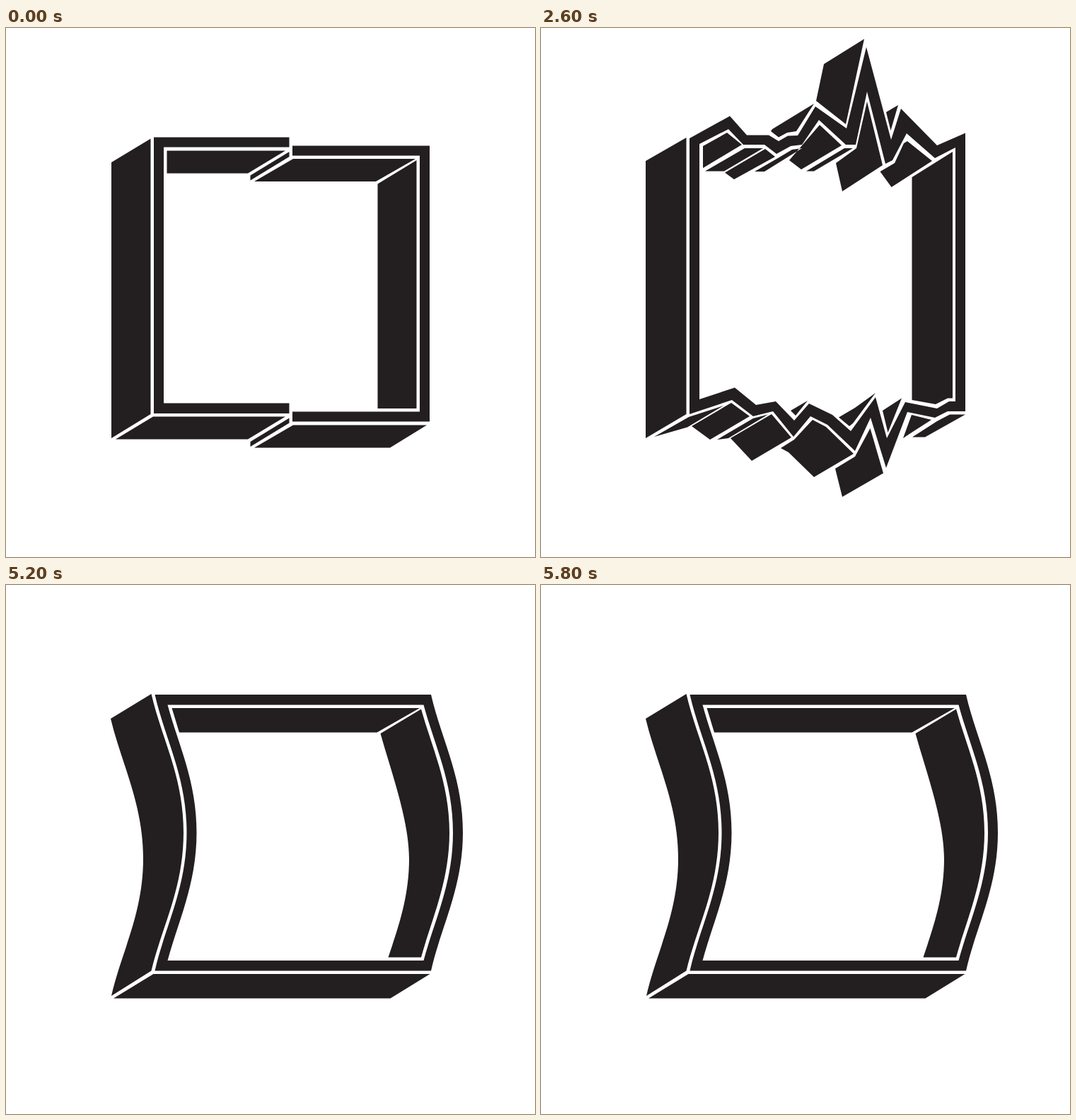
Recreate the animation shown at these times as an HTML page. Size 748x748 px, loop 7.8 s.

```html
<!DOCTYPE html>
<html lang="en">
<head>
<meta charset="utf-8">
<title>Shifting frame</title>
<style>
  html, body { margin: 0; width: 100%; height: 100%; overflow: hidden; background: #fff; }
  svg { display: block; width: 100%; height: 100%; fill: #231f20; fill-rule: evenodd; }
</style>
</head>
<body>
<svg viewBox="0 0 748 748">
  <g class="pose" id="split">
    <path d="M149 190L204.5 156.500V546L149 580Z
      M209 154.500H400.500V168.500H223V530.500H400.500V545H209Z
      M227.500 173.500H395L342 205.500H227.500Z
      M208 549.500H395L342 581.500H155Z"/>
    <path d="M400.500 175V182L345.500 215.500V208.500Z
      M400.500 551.500V558.500L345.500 592V585Z"/>
    <path d="M405 166.500H599V556.500H405V542.500H585V180.500H405Z
      M406 185H579L523 217H351Z
      M580.500 187V538H525.500V220.500Z
      M406 561.500H595L543 593.500H351Z"/>
  </g>
  <g class="pose" id="jagged" visibility="hidden">
    <path class="front" d="M210 156L267 124.500 291 151.500H322L336 160 349 152.500 363 152 388 111 432 142 460 27
      495 158 509 114 560 166 600 148.500V542H575L557 551 518 543 488 622 466 551 444 598 405 561 381 549
      357 578 328 542 300 549 270 526 210 546Z
      M224 164L265 143 286 165H316L333 178 353 167 369 165 393 130 431 165H445L461 90 487 192 497 187
      517 149 557 184 586 169V528H577L560 538 515 529 489 580 473 522 438 570 412 547 379 531
      358 555 332 528 304 533 274 508.500 224 525Z"/>
    <path class="top" d="M148 188L205.500 155V546L148 580Z
      M327 143L386 107 361 146 348 148 336 154.500 325 146Z
      M389 103L400 51 457 15.500 431 136Z
      M488 119L505 109 494.500 145Z
      M229 167L263 148 284 165 229 198Z
      M288 170H314L259 202.500H232Z
      M317 171L331 182 273 214 260 204.500Z
      M302 203L335 184 355 172 369 170 316 203Z
      M394 137L425 166 368 200 351 187Z
      M429 170H441L386 202.500H375Z
      M461 104L483 194 426 231 417 191 446 170Z
      M479.500 203L500 191 513 163 518 160 553 188 495.500 225Z
      M524.500 211L582 175V523.500H575L558 532 524.500 526Z"/>
    <path class="bottom" d="M353 541L377 527 360 548Z
      M421 550.500L444 537 473 516 441 559 436 563Z
      M483 541L510 523.500 490.500 572Z
      M160 578L209 550 258 534 207 564.500Z
      M213 563L269 530 295 549 239 582Z
      M249 582L300 552 321 546.500 265 580Z
      M268 580L326 546 354 579 298 612Z
      M339 594L358 582 384 554 403 564 442 602 386 635 350 600Z
      M416 623L444 606 465.500 566 484 629.500 426 663Z
      M512 580L524 547 552 554 524 572Z
      M525 578.500L560 556 578 546.500H600L543 578.500Z"/>
  </g>
  <g class="pose" id="bent" visibility="hidden">
    <path d="M148 189L205.500 154c14 62 45.500 116 45.500 196s-31 134-45.500 195.500L149 581
      c14-62 45-116 45-194s-31-135-46-198Z"/>
    <path d="M210.500 155H601c14 62 45 116 45 195s-31 133-45 195.500H210.500
      c14-62 45-116 45-195.500s-31-133-45-195Z
      M228.500 169.500H590.500c15 56 41.500 108 41.500 180.500s-26.500 125-41.500 181H228.500
      c15-56 41-108 41-181s-26-124.500-41-180.500Z"/>
    <path d="M234.500 174H585L524.500 208.500H245Z
      M587 175.500c15 54 40 105 40 174.500s-25 122-40 176.500H540.500
      c14-42 29.500-85 29.500-139.500s-25.500-123-40.500-177Z
      M208.500 550H599.500L543.500 584.500H152Z"/>
  </g>
</svg>
<script>
  const poses = document.querySelectorAll('.pose');
  const SECTION = 2600, FLICKER = 100, STEPS = 6;

  // Each section cycles the poses twice, then rests on its own pose.
  function draw(now) {
    const time = now % (SECTION * poses.length);
    const section = Math.floor(time / SECTION);
    const step = Math.min(STEPS, Math.floor((time % SECTION) / FLICKER));
    const current = (section + step) % poses.length;
    poses.forEach((pose, i) => pose.setAttribute('visibility', i === current ? 'visible' : 'hidden'));
  }

  const start = performance.now();
  function tick() {
    draw(performance.now() - start);
    requestAnimationFrame(tick);
  }
  tick();
</script>
</body>
</html>
```
